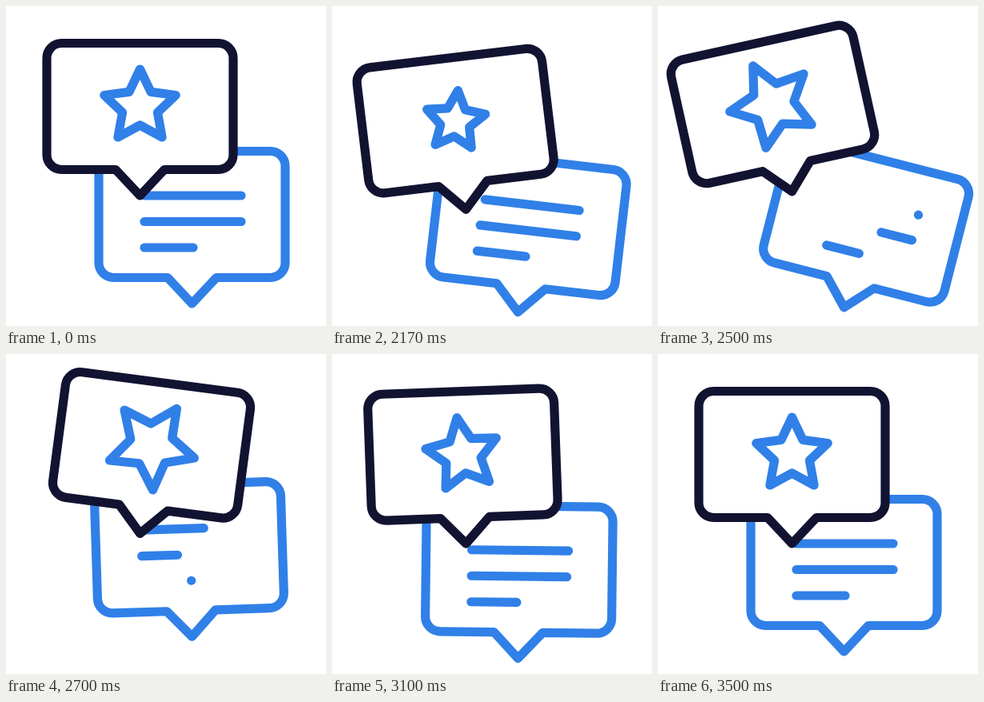
Animation of 400x400 px, one loop 3.52 s. Source, as an HTML page:

```html
<!DOCTYPE html>
<html lang="en">
<head>
<meta charset="utf-8">
<title>Speech bubbles</title>
<style>
  html, body { margin: 0; width: 100%; height: 100%; overflow: hidden; background: #fff; }
  svg {
    display: block; width: 100%; height: 100%;
    fill: none; stroke-width: 11.2; stroke-linecap: round; stroke-linejoin: round;
  }
  .front { stroke: #121331; }
  .back, .star { stroke: #3080e8; }
  .shell { fill: #fff; }

  /* Every moving group has its pivot at its local origin. */
  .front, .back, .star {
    transform-origin: 0 0;
    animation: 3520ms ease-in-out infinite;
  }
  .front { animation-name: front-turn, front-hop; }
  .back { animation-name: back-turn, back-hop; }
  .star { animation-name: spin, pulse; vector-effect: non-scaling-stroke; }

  .line {
    --len: 121px;
    stroke-dasharray: var(--len) 400px;
    stroke-dashoffset: 0px;
    animation: rewrite 3520ms linear infinite;
  }
  .second { animation-delay: 100ms; }
  .third { --len: 61px; animation-delay: 200ms; }

  @keyframes front-turn {
    0% { rotate: 0deg; }
    56.82% { rotate: 0deg; animation-timing-function: cubic-bezier(.3, .1, .6, 1); }
    68.89% { rotate: -15.3deg; }
    77.84% { rotate: 8.2deg; }
    89.2% { rotate: -2.3deg; }
    99.43%, 100% { rotate: 0deg; }
  }
  @keyframes front-hop {
    0% { translate: 0 0; }
    56.82% { translate: 0 0; animation-timing-function: cubic-bezier(.3, .1, .6, 1); }
    66.19% { translate: 0 28px; }
    73.86% { translate: 0 -18px; }
    82.1% { translate: 0 3px; }
    88.64%, 100% { translate: 0 0; }
  }
  @keyframes back-turn {
    0% { rotate: 0deg; }
    56.82% { rotate: 0deg; animation-timing-function: cubic-bezier(.3, .1, .6, 1); }
    69.32% { rotate: 15.4deg; }
    80.97% { rotate: -8.4deg; }
    91.48% { rotate: 3.2deg; }
    99.43%, 100% { rotate: 0deg; }
  }
  @keyframes back-hop {
    0% { translate: 0 0; }
    56.82% { translate: 0 0; animation-timing-function: cubic-bezier(.3, .1, .6, 1); }
    67.05% { translate: 0 19px; }
    76.42% { translate: 0 -18.8px; }
    87.5% { translate: 0 8.5px; }
    99.43%, 100% { translate: 0 0; }
  }
  @keyframes spin {
    0% { rotate: 0deg; }
    56.82% { rotate: 0deg; animation-timing-function: cubic-bezier(.47, 0, .44, 1); }
    92.61%, 100% { rotate: 360deg; }
  }
  @keyframes pulse {
    0%, 56.82% { scale: 1; }
    65.34% { scale: .71; }
    73.01% { scale: 1.23; }
    85.23%, 100% { scale: 1; }
  }
  /* Wipe out to the right, then write again from the left; a dot always remains. */
  @keyframes rewrite {
    0% { stroke-dashoffset: 0px; }
    61.08% { stroke-dashoffset: 0px; animation-timing-function: cubic-bezier(.4, .1, .75, .8); }
    71.02% { stroke-dashoffset: calc(.1px - var(--len)); }
    71.3% { stroke-dashoffset: calc(.1px - var(--len)); animation-timing-function: step-end; }
    71.31% { stroke-dashoffset: calc(var(--len) - .1px); animation-timing-function: cubic-bezier(.3, .85, .65, 1); }
    88.07%, 100% { stroke-dashoffset: 0px; }
  }
</style>
</head>
<body>
<svg viewBox="0 0 400 400">
  <defs>
    <path id="bubble" d="M-30.5-32.5H-98a18.5 18.5 0 0 1-18.5-18.5V-172a18.5 18.5 0 0 1 18.5-18.5H98a18.5 18.5 0 0 1 18.5 18.5V-51a18.5 18.5 0 0 1-18.5 18.5H30.5L0 0Z"/>
  </defs>

  <g transform="translate(232.5 372)">
    <g class="back">
      <use href="#bubble"/>
      <path class="line" d="M-59.5-135h121"/>
      <path class="line second" d="M-59.5-102.5h121"/>
      <path class="line third" d="M-59.5-70h61"/>
    </g>
  </g>

  <g transform="translate(167.5 237)">
    <g class="front">
      <use class="shell" href="#bubble"/>
      <g transform="translate(0 -111)">
        <path class="star" d="M0-47L13.5-18.6 44.7-14.5 21.9 7.1 27.6 38 0 23-27.6 38-21.9 7.1-44.7-14.5-13.5-18.6Z"/>
      </g>
    </g>
  </g>
</svg>
</body>
</html>
```
